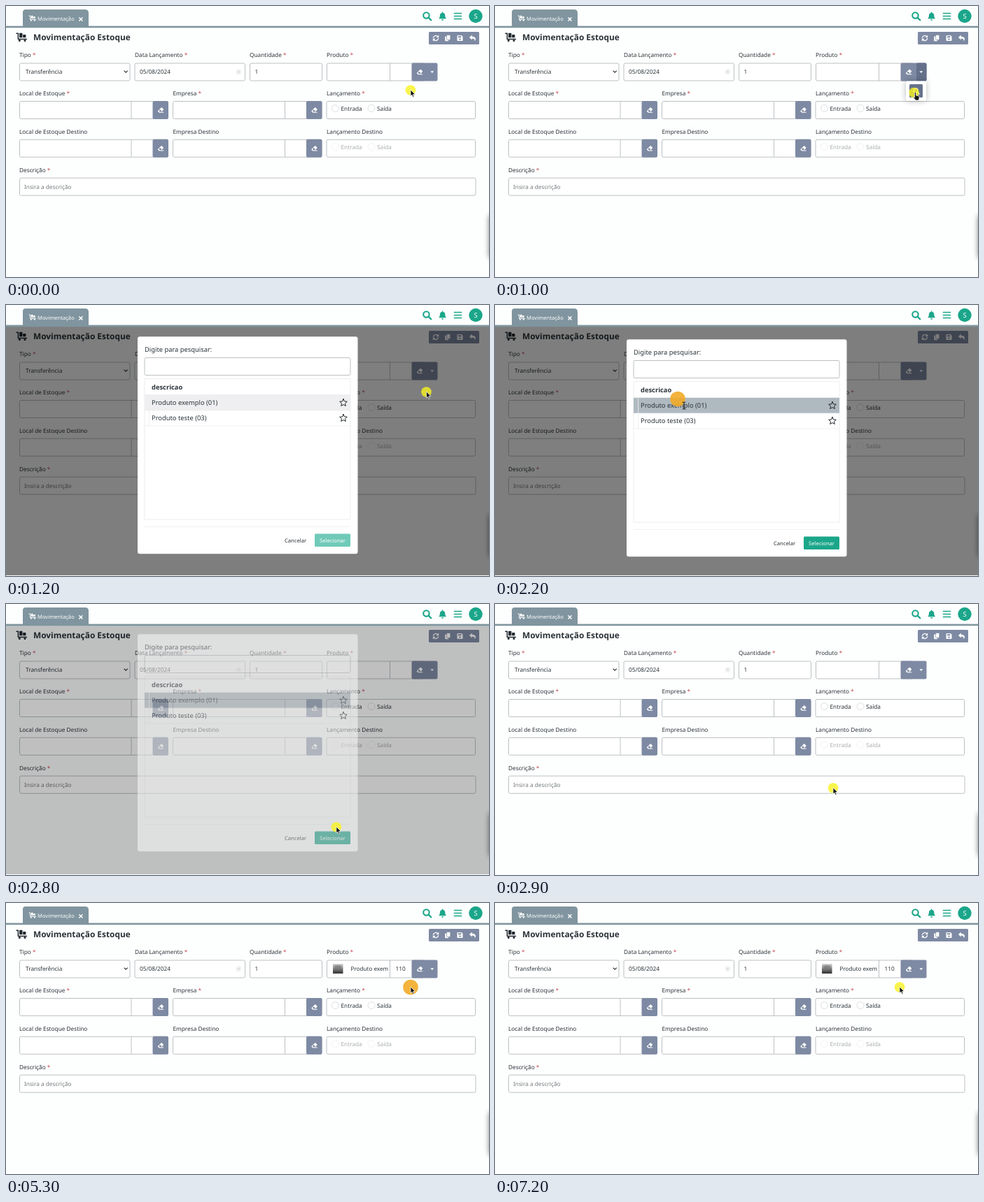
An HTML page for the animation above (7300 ms loop, 690 by 388 pixels).

```html
<!DOCTYPE html>
<html lang="pt">
<head>
<meta charset="utf-8">
<title>Movimentação Estoque</title>
<style>
html, body { margin: 0; width: 100%; height: 100%; overflow: hidden; background: #fdfefe; }
svg { display: block; width: 100vw; height: 100vh; }
text { font-family: "Noto Sans", "Open Sans", sans-serif; font-size: 8.25px; fill: #2b3338; text-rendering: geometricPrecision; }
</style>
</head>
<body>
<svg id="stage" viewBox="0 0 690 388"></svg>
<script>
const LOOP = 7300, STEP = 100;
const SLATE = '#7e8aa3', TEAL = '#1ba68a', LINE = '#bcc0c3';

const rect = (x, y, w, h, fill, more = '') =>
  `<rect x="${x}" y="${y}" width="${w}" height="${h}" fill="${fill}" ${more}/>`;
const text = (x, y, s, more = '') => `<text x="${x}" y="${y}" ${more}>${s}</text>`;
const path = (d, more) => `<path d="${d}" ${more}/>`;
const at = (x, y, body, scale = 1) => `<g transform="translate(${x} ${y}) scale(${scale})">${body}</g>`;
const stroke = (color, w) => `fill="none" stroke="${color}" stroke-width="${w}" stroke-linecap="round" stroke-linejoin="round"`;

const label = (x, y, s, required = true) =>
  text(x, y, s + (required ? ' <tspan fill="#c8505a">*</tspan>' : ''));
const box = (x, y, w, h = 25) => rect(x + .5, y + .5, w - 1, h, '#fff', `rx="2" stroke="${LINE}"`);
const divider = (x, y) => path(`M${x} ${y}v25`, `stroke="${LINE}"`);

const eraser = (x, y) => at(x, y,
  path('M-4 1.2L.6-3.4Q1.2-4 1.8-3.4L3.8-1.4Q4.4-.8 3.8-.2L.9 2.7H4.2V3.8H-2.2L-4 2Q-4.4 1.6-4 1.2Z', 'fill="#fff"') +
  path('M-2.6 1.1L-.8-.7L1.4 1.5L.2 2.7H-1Z', `fill="${SLATE}"`));

const cart = (x, y, color, scale) => at(x, y,
  path('M0 .8H2.4V9H14.5', stroke(color, 1.5)) +
  rect(4.2, .2, 4.2, 6.6, color, 'rx=".5"') + rect(9.2, 2.4, 4.2, 4.4, color, 'rx=".5"') +
  `<circle cx="4.3" cy="11" r="1.5" fill="${color}"/><circle cx="12" cy="11" r="1.5" fill="${color}"/>`, scale);

const magnifier = (x, y, color, scale) => at(x, y,
  `<circle cx="-1" cy="-1" r="4" ${stroke(color, 2)}/>` + path('M2.2 2.2L5.5 5.5', stroke(color, 2.2)), scale);

const lookup = (x, y, w) =>
  box(x, y, w) + divider(x + w - 53, y) +
  rect(x + w - 22.5, y, 22.5, 26, SLATE, 'rx="2"') + eraser(x + w - 11, y + 13);

const radio = (x, y, s, off) =>
  `<circle cx="${x}" cy="${y}" r="5" fill="#fff" stroke="${off ? '#eceeef' : '#d2d6d9'}" stroke-width=".8"/>` +
  text(x + 8, y + 3.2, s, off ? 'fill="#a9adb0" style="fill:#a9adb0"' : '');

function header() {
  const bars = [10.5, 14.5, 18.5].map(y => path(`M640.5 ${y}h10`, stroke(TEAL, 1.7))).join('');
  return rect(0, 0, 690, 29, '#fdfefe') + rect(0, 28.6, 690, 2.6, '#7f959e') +
    path('M24 29V9Q24 5 28 5H113Q118 5 118 10V29Z', 'fill="#80959f"') +
    cart(33, 13.5, '#fff', .66) +
    text(45, 20.6, 'Movimentação', 'style="fill:#fff;font-size:7.6px"') +
    path('M104.8 16.8l4.2 4.2M109 16.8l-4.2 4.2', stroke('#fff', 1.5)) +
    magnifier(601.5, 14.5, TEAL, 1.05) +
    path('M618.3 18.3Q620 16.5 620 13Q620 10 623.6 9.4Q627.2 10 627.2 13Q627.2 16.5 628.9 18.3ZM622 19.2h3.2q-.3 1.6-1.6 1.6t-1.6-1.6ZM623 8.6h1.2v1.4h-1.2z', `fill="${TEAL}"`) +
    bars + `<circle cx="671" cy="14.5" r="9.7" fill="${TEAL}"/>` +
    text(671, 18, 'S', 'text-anchor="middle" style="fill:#fff;font-size:9.5px"');
}

function toolbar() {
  const white = stroke('#fff', 1.3);
  return rect(604, 37, 72, 18, SLATE, 'rx="1.5"') +
    at(614, 46, path('M-3.6-.6A3.7 3.7 0 0 1 2.8-2.3M3.6.6A3.7 3.7 0 0 1-2.8 2.3', white) +
      path('M4.2-4.4V-.8H.6ZM-4.2 4.4V.8H-.6Z', 'fill="#fff"')) +
    at(631, 46, rect(-3.8, -2.4, 5, 6.6, '#fff', 'rx=".7"') +
      rect(-1.4, -4.4, 5.2, 6.8, '#fff', `rx=".7" stroke="${SLATE}" stroke-width=".7"`)) +
    at(648.5, 46, path('M-4-3.2Q-4-4-3.2-4H2.2L4-2.2V3.2Q4 4 3.2 4H-3.2Q-4 4-4 3.2Z', 'fill="#fff"') +
      rect(-2.6, -2.8, 4.4, 2, SLATE) + `<circle cy="1.6" r="1.2" fill="${SLATE}"/>`) +
    at(666.5, 46, path('M-4.6-1L-.8-4.4V-2.3Q4.4-2.2 4.4 1.4Q4.4 3.2 2.9 4.2Q3.8.4-.8.4V2.4Z', 'fill="#fff"'));
}

function form() {
  return cart(15, 38.5, '#1f272d', 1) +
    text(39, 49.2, 'Movimentação Estoque', 'font-weight="600" style="font-size:11.9px"') + toolbar() +
    label(19, 73, 'Tipo') + box(19, 81.5, 158.5) + text(28, 97.3, 'Transferência') +
    path('M169 93l2.2 2.2l2.2-2.2', stroke('#333', 1.1)) +
    label(184, 73, 'Data Lançamento') + box(183.5, 81.5, 158.5) + text(191, 97.3, '05/08/2024') +
    `<circle cx="332.5" cy="94.3" r="4" fill="#f1f2f3"/>` + path('M331.4 93.2l2.2 2.2m0-2.2l-2.2 2.2', stroke('#c4c8ca', .7)) +
    label(348, 73, 'Quantidade') + box(348, 81.5, 104) + text(355.5, 97.3, '1') +
    label(458, 73, 'Produto') + box(458, 81.5, 140) + divider(548.5, 82) +
    rect(579.5, 81.5, 37, 26, SLATE, 'rx="2"') + rect(602, 81.5, 14.5, 26, '#65718b', 'id="toggle" rx="2"') +
    eraser(591, 94.5) + path('M606.4 93.3h4.8l-2.4 2.6z', 'fill="#fff"') +
    `<g id="product">${rect(467, 87, 14.5, 14, 'url(#photo)')}` +
    path('M469 90q5-2 10 0l-1 5q-4 3-7 0z', 'fill="#777" opacity=".6"') +
    text(492.5, 97.3, 'Produto exem', 'style="font-size:8.1px"') + text(556.5, 97.3, '110') + '</g>' +
    label(19, 128, 'Local de Estoque') + lookup(19, 136, 213) +
    label(238.5, 128, 'Empresa') + lookup(238, 136, 213.5) +
    label(458, 128, 'Lançamento') + box(457.5, 136, 213.5) +
    radio(470.5, 146.5, 'Entrada') + radio(522, 146.5, 'Saída') +
    label(19, 183, 'Local de Estoque Destino', false) + lookup(19, 190.8, 213) +
    label(238.5, 183, 'Empresa Destino', false) + lookup(238, 190.8, 213.5) +
    label(458, 183, 'Lançamento Destino', false) + box(457.5, 190.8, 213.5) +
    radio(470.5, 201.5, 'Entrada', true) + radio(522, 201.5, 'Saída', true) +
    label(19, 237.8, 'Descrição') + box(19, 245.7, 652.5) +
    text(26, 262, 'Insira a descrição', 'style="fill:#74797d"') +
    rect(691, 300, 12, 60, '#000', 'filter="url(#soft)" opacity=".6"');
}

const menu = () =>
  `<g id="menu">${rect(587, 107.5, 29, 28.5, '#000', 'filter="url(#soft)" opacity=".28"')}` +
  rect(587, 107.5, 29, 28.5, '#fff', 'rx="2"') + rect(592, 112, 19, 19, '#66728c', 'rx="1.5"') +
  magnifier(601.8, 121.8, '#fff', .75) + '</g>';

function star(x, y) {
  const pts = Array.from({ length: 10 }, (_, i) => {
    const r = i % 2 ? 2.6 : 5.6, a = i * Math.PI / 5;
    return `${(r * Math.sin(a)).toFixed(2)},${(-r * Math.cos(a)).toFixed(2)}`;
  });
  return at(x, y, `<polygon points="${pts.join(' ')}" ${stroke('#22282c', 1)}/>`);
}

function modal() {
  const size = 'style="font-size:9.35px"', pale = '#eceeef';
  return `<g id="modal">${rect(188, 49.3, 314.5, 311, '#fff', 'rx="3"')}` +
    text(198, 70.8, 'Digite para pesquisar:', size) + box(197.5, 79, 295) +
    rect(198, 109.5, 294, 201.5, '#fff', `stroke="${pale}"`) +
    text(208, 125, 'descricao', 'font-weight="700" ' + size) +
    rect(198, 132.7, 294, 22.3, '#efeff1', 'id="row"') +
    path('M198 132.5H492M198 155H492M198 177H492M204.5 133V177', `stroke="${pale}" stroke-width=".8"`) +
    text(208, 147.2, 'Produto exemplo (01)', size) + star(482, 144) +
    text(208, 169, 'Produto teste (03)', size) + star(482, 166) +
    path('M198 321.5H492', `stroke="${pale}" stroke-width=".8"`) +
    text(398, 343.8, 'Cancelar', 'style="font-size:7.6px"') +
    rect(441, 331.5, 51, 18.5, TEAL, 'id="ok" rx="1.5"') +
    text(448, 343.8, 'Selecionar', 'style="fill:#fff;font-size:7.6px"') + '</g>';
}

const pointer = () =>
  '<circle id="halo"/>' +
  path('M0 0L0 9L2 7.3L3.5 10.4L5 9.7L3.6 6.7L6.4 6.4Z', 'id="arrow" fill="#16181a" stroke="#fff" stroke-width=".7"') +
  path('M0 1Q0 0 1 0T2 1V4.5L5.8 5.4Q6.8 5.8 6.6 7L6 11.5H1.4L-1.8 7.6Q-2 6.6-1 6.7L0 7.5Z', 'id="hand" fill="#16181a" stroke="#fff" stroke-width=".7"') +
  path('M-2-5Q0-5 0-4Q0-5 2-5M0-4V4M-2 5Q0 5 0 4Q0 5 2 5', `id="beam" ${stroke('#22282c', 1.1)}`);

const svg = document.getElementById('stage');
svg.innerHTML = `<defs>
  <filter id="soft" x="-100%" y="-100%" width="300%" height="300%"><feGaussianBlur stdDeviation="4"/></filter>
  <linearGradient id="photo" x2="0" y2="1"><stop stop-color="#d8d8d8"/><stop offset=".45" stop-color="#868686"/><stop offset="1" stop-color="#303030"/></linearGradient>
</defs>` + rect(0, 0, 690, 388, '#fdfefe') + form() + menu() +
  rect(0, 30, 690, 357, '#000', 'id="dim"') + header() + modal() + pointer();

const el = {};
svg.querySelectorAll('[id]').forEach(n => el[n.id] = n);

// Pointer stops: time, x, y
const stops = [
  [0, 578, 120.5], [300, 608, 95], [700, 608, 95], [1000, 598.5, 124], [1200, 600.5, 124.5],
  [1400, 600.5, 124.5], [1650, 430, 76], [1900, 261, 134.5], [2300, 261, 134.5],
  [2600, 468, 339], [2750, 468, 339], [2900, 483, 263.5], [3300, 578, 121], [3400, 578, 121],
  [4700, 578, 121], [5300, 578, 120.5], [LOOP, 578, 120.5]
];
const ORBIT = { from: 3400, to: 4700, x: 536, y: 104.5, rx: 70, ry: 20.5, start: Math.acos(.6), laps: 2 };

const clamp = v => Math.max(0, Math.min(1, v));
const ramp = (t, a, b) => clamp((t - a) / (b - a));
const within = (t, a, b) => t >= a && t < b;

function pointerAt(t) {
  if (within(t, ORBIT.from, ORBIT.to)) {
    const a = ORBIT.start + ORBIT.laps * 2 * Math.PI * ramp(t, ORBIT.from, ORBIT.to);
    return [ORBIT.x + ORBIT.rx * Math.cos(a), ORBIT.y + ORBIT.ry * Math.sin(a)];
  }
  const i = stops.findIndex(s => s[0] > t);
  const [t0, x0, y0] = stops[i - 1], [t1, x1, y1] = stops[i];
  let k = ramp(t, t0, t1);
  k = k * k * (3 - 2 * k);
  return [x0 + (x1 - x0) * k, y0 + (y1 - y0) * k];
}

const set = (node, attrs) => { for (const k in attrs) node.setAttribute(k, attrs[k]); };
const show = (node, on) => set(node, { visibility: on ? 'visible' : 'hidden' });

function draw(t) {
  const menuOpen = within(t, 600, 1100);
  show(el.menu, menuOpen);
  show(el.toggle, menuOpen);
  show(el.product, t >= 3200);

  const shown = ramp(t, 1000, 1200) * (1 - ramp(t, 2700, 2900));
  const lift = -12 * (1 - ramp(t, 1000, 1300)) - 12 * ramp(t, 2700, 2900);
  set(el.dim, { opacity: .5 * shown });
  set(el.modal, { opacity: shown, transform: `translate(0 ${lift})` });
  show(el.modal, shown > 0);
  const picked = t >= 2200;
  set(el.row, { fill: picked ? '#afb9c0' : '#efeff1' });
  set(el.ok, { fill: picked ? TEAL : '#70cab8' });

  const [x, y] = pointerAt(t);
  const click = [[600, 800], [1100, 1200], [2200, 2400], [2700, 2800], [5200, 5500]].some(c => within(t, ...c));
  set(el.halo, { cx: x, cy: y, r: click ? 10.8 : 7.3, fill: click ? '#f2ab27' : '#f7f21f', opacity: click ? .9 : .8 });

  const beam = within(t, 1900, 2400), hand = within(t, 900, 1100) || within(t, 2600, 2800);
  show(el.beam, beam);
  show(el.hand, hand);
  show(el.arrow, !beam && !hand);
  set(el.beam, { transform: `translate(${x + 9} ${y + 9.5})` });
  set(el.hand, { transform: `translate(${x + 1} ${y - .5})` });
  set(el.arrow, { transform: `translate(${x} ${y - .5})` });
}

const begin = performance.now();
function tick() {
  const t = (performance.now() - begin) % LOOP;
  draw(Math.floor(t / STEP) * STEP);
  requestAnimationFrame(tick);
}
tick();
</script>
</body>
</html>
```
